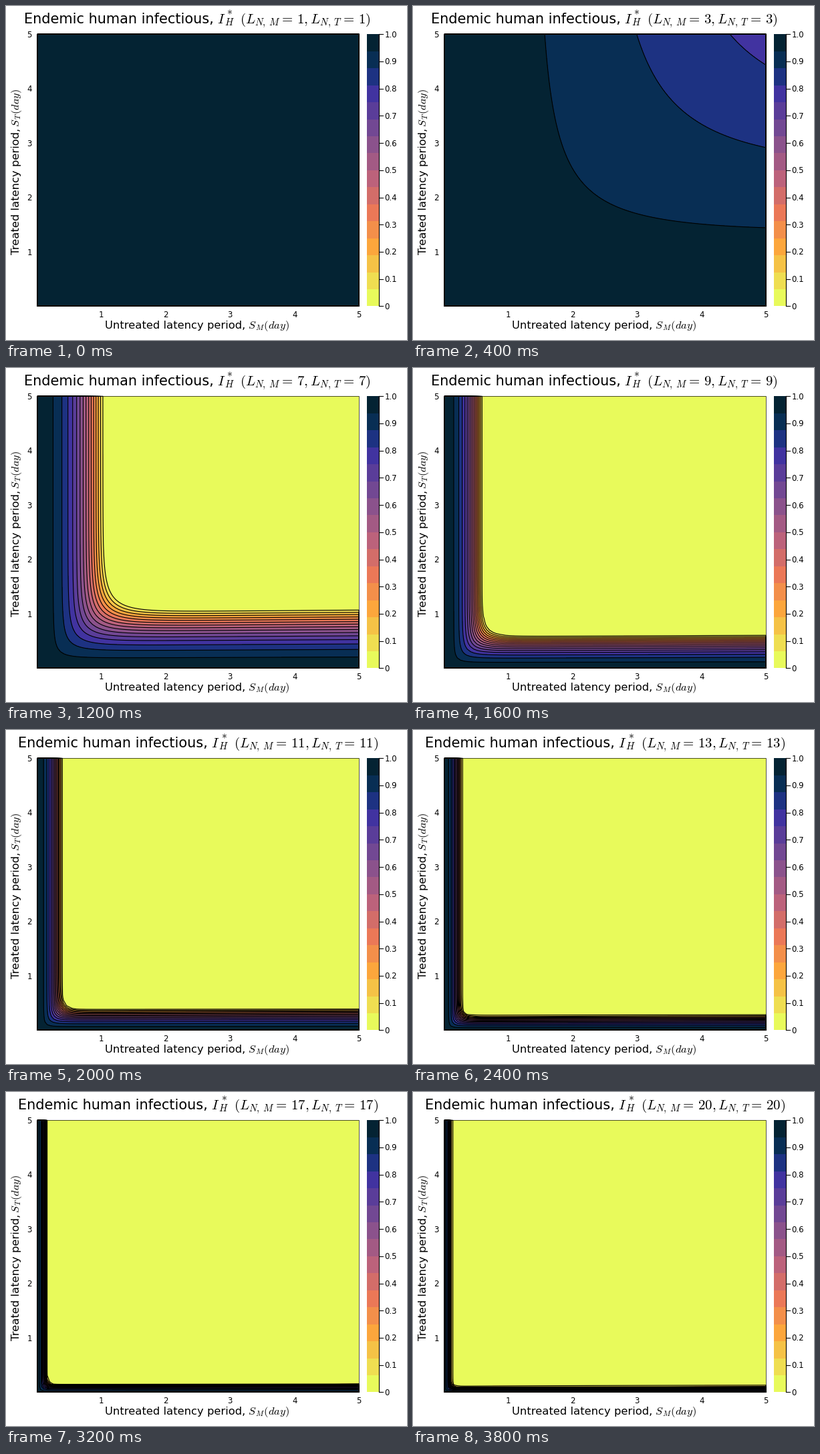
Recreate the animation shown at these times as a matplotlib script. Size 600 by 500 pixels, loop 4000 ms.

```python
import numpy as np
import matplotlib.pyplot as plt
from matplotlib.animation import FuncAnimation
from matplotlib.colors import LinearSegmentedColormap
from matplotlib.patches import Rectangle

plt.rcParams["font.family"] = "DejaVu Sans"
plt.rcParams["mathtext.fontset"] = "cm"

W, H, DPI = 600, 500, 100
LEFT, RIGHT, TOP, BOTTOM = 47.2, 528.0, 42.3, 449.4
LO, HI = 0.01, 5.0
BANDS = 16
TITLE, LABEL, TICK = 15, 11.75, 8.5

# key colours of a thermal ramp, low to high, placed by band
RAMP = {0: "#e8fa5b", 3: "#fca63c", 5: "#eb7857", 7: "#bc627b", 9: "#8b528c",
        12: "#4133a0", 13: "#1d3282", 14: "#082e54", 15: "#042333"}
thermal = LinearSegmentedColormap.from_list(
    "thermal", [(i / (BANDS - 1), c) for i, c in RAMP.items()])
COLORS = thermal(np.linspace(0, 1, BANDS))
LEVELS = np.arange(1, BANDS) / BANDS


def px(v):
    return LEFT + (v - LO) / (HI - LO) * (RIGHT - LEFT)


def py(v):
    return BOTTOM - (v - LO) / (HI - LO) * (BOTTOM - TOP)


grid = np.linspace(LO, HI, 100)
SM, ST = np.meshgrid(grid, grid)


def infectious(n):
    """Endemic infectious share for n stages over both latency periods."""
    decay = 0.0705 * n**4 / (n**2 + 15)
    untreated = 440 * n**-1.66 * np.exp(-decay * SM) / SM
    treated = 408 * n**-1.88 * np.exp(-0.805 * decay * ST) / ST
    r = untreated + treated * (1 + 0.03 * SM)
    return np.clip(0.992 * (r - 1) / (r + 1), 0, 1)


def ring(axis):
    step = 0.01 * np.sign(axis[1] - axis[0])
    return np.concatenate([[axis[0] - step], axis, [axis[-1] + step]])


GX, GY = px(grid), py(grid)
RX, RY = ring(GX), ring(GY)

fig = plt.figure(figsize=(W / DPI, H / DPI), dpi=DPI, facecolor="white")
ax = fig.add_axes([0, 0, 1, 1])


def write(x, y, s, size, **kw):
    return ax.text(x, y, s, fontsize=size,
                   **{"va": "baseline", "rotation_mode": "anchor", **kw})


def box(x, y, w, h, **kw):
    ax.add_patch(Rectangle((x, y), w, h, **kw))


def draw_frame():
    area = (LEFT, TOP, RIGHT - LEFT, BOTTOM - TOP)
    box(*area, fc=COLORS[0], ec="none", zorder=0)
    box(*area, fc="none", ec="black", lw=0.6, alpha=0.8, zorder=5)
    for v in range(1, 6):
        write(px(v), 465.6, str(v), TICK, ha="center")
        write(39, py(v) + 4.4, str(v), TICK, ha="right")

    write(148, 483, "Untreated latency period,", LABEL)
    write(362, 483, r"$S_{\,M}(day)$", LABEL)
    write(20, 372, "Treated latency period,", LABEL, rotation=90)
    write(20, 181, r"$S_{\,T}(day)$", LABEL, rotation=90)


def draw_colorbar():
    h = (BOTTOM - TOP) / BANDS
    for i, c in enumerate(COLORS):
        box(540, BOTTOM - (i + 1) * h, 18, h, fc=c, ec="none")
    ax.plot([558, 558], [TOP, BOTTOM], color="black", lw=0.8)
    for v in np.linspace(0, 1, 11):
        y = BOTTOM - v * (BOTTOM - TOP)
        ax.plot([558, 564], [y, y], color="black", lw=0.8)
        write(566.5, y + 4.4, f"{v:.1f}" if v else "0", TICK)


draw_frame()
draw_colorbar()
title = [
    write(0, 26.3, "Endemic human infectious,", TITLE),
    write(288.5, 26.3, r"$I_{\,H}$", TITLE),
    write(307.5, 8, "$*$", TITLE * 0.75, ha="center", va="center"),
    write(322.5, 26.3, "", TITLE),
]
offsets = [t.get_position()[0] for t in title]
shown = []


def update(i):
    n = i + 1
    while shown:
        shown.pop().remove()
    z = infectious(n)
    shown.append(ax.contourf(GX, GY, z, levels=[*LEVELS, 1.01],
                             colors=COLORS[1:], zorder=1))
    # a zero rim closes each contour along the plot border
    shown.append(ax.contour(RX, RY, np.pad(z, 1), levels=LEVELS,
                            colors="black", linewidths=0.8, zorder=2))
    start = 27 if n < 10 else 18.5
    for t, dx in zip(title, offsets):
        t.set_x(start + dx)
    title[-1].set_text(
        rf"$(L_{{N,\:M}}=\,{n}, L_{{N,\:T}}=\,{n})$")
    ax.set_xlim(0, W)
    ax.set_ylim(H, 0)
    ax.axis("off")
    return []


anim = FuncAnimation(fig, update, frames=20, interval=200,
                     init_func=lambda: [], repeat=True, repeat_delay=0)
plt.show()
```
